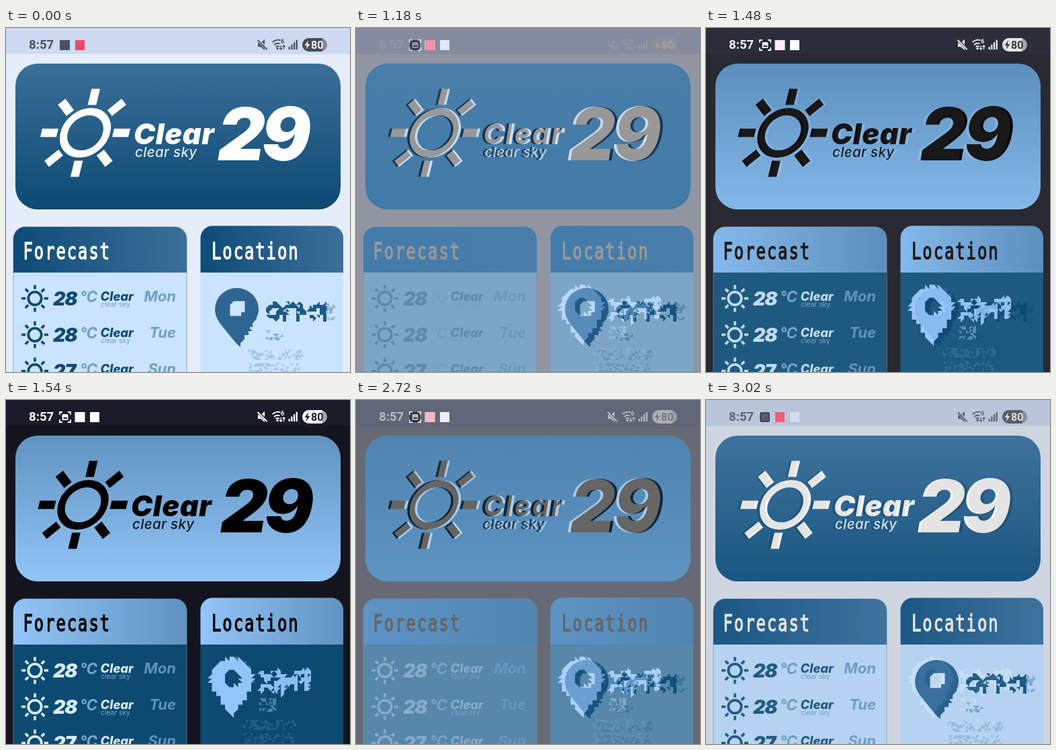
Write an HTML page that moves like this. It is 512x512 px and loops after 3.08 s.

```html
<!DOCTYPE html>
<html lang="en">
<head>
<meta charset="utf-8">
<title>Weather theme switch</title>
<style>
html, body { margin: 0; width: 100%; height: 100%; overflow: hidden; background: #14141e; }
svg { display: block; width: 100vw; height: 100vh; }
text { font-family: Inter, "Open Sans", sans-serif; white-space: pre; }
.bar { font-family: Roboto, Inter, sans-serif; font-weight: 700; }
.head { font-family: "DejaVu Sans Mono", monospace; font-size: 27px; letter-spacing: 2.3px; stroke-width: 1.1px; }
.it { font-style: italic; }
</style>
</head>
<body>
<svg id="stage" viewBox="0 0 512 512" xmlns="http://www.w3.org/2000/svg"></svg>
<script>
const LIGHT = {
  id: 'light', bg: '#e6edfa', bar: '#cddaf1', edge: '#a9bdd6',
  top: '#3b6e9a', bottom: '#0c4a73', left: '#0e4b76', right: '#3c6f9b',
  body: '#cae4ff', ink: '#ffffff', status: '#4b5161',
  pill: '#484a55', pillEnd: '#858a97', pillInk: '#f4f6fb',
  strong: '#0f4a74', soft: '#6f9fc5', day: '#6f9fc5',
  pin: '#2f6592', word: '#1f5a85', haze: '#8fb7da',
  sunX: 118, wordX: 190, tempX: 315, pinX: 343, pinY: 419,
  textBox: [382, 402, 494, 440], line2: [387, 450, 412, 465], line3: [360, 479, 443, 512],
  strokes: [
    [389, 421, 402, 410], [402, 410, 410, 419], [409, 420, 401, 432], [400, 432, 390, 427],
    [418, 411, 414, 433], [418, 414, 429, 413], [438, 408, 434, 433], [437, 419, 449, 424],
    [452, 420, 466, 413], [466, 413, 473, 433], [456, 431, 470, 428], [476, 413, 474, 433]
  ]
};
const DARK = {
  id: 'dark', bg: '#14141e', bar: '#1b1a28', edge: '#4d5866',
  top: '#6093c0', bottom: '#92c5f7', left: '#93c5f9', right: '#6093c0',
  body: '#0c4a72', ink: '#000000', status: '#ffffff',
  pill: '#f3f4f7', pillEnd: '#a6a7ac', pillInk: '#24252e',
  strong: '#d6eaff', soft: '#78a4ca', day: '#5f92bc',
  pin: '#93c5fb', word: '#8bbef2', haze: '#2e6a95',
  sunX: 114.5, wordX: 186, tempX: 319, pinX: 336, pinY: 416,
  textBox: [374, 398, 458, 440], line2: [377, 444, 401, 463], line3: [352, 476, 431, 510],
  strokes: [
    [380, 405, 397, 432], [397, 405, 380, 432], [405, 404, 403, 432],
    [413, 411, 411, 437], [413, 413, 423, 419], [423, 420, 412, 429],
    [432, 431, 430, 409], [430, 408, 450, 403], [428, 418, 442, 416], [450, 404, 447, 431]
  ]
};

let seed = 1;
const rnd = () => (seed = (seed * 48271) % 2147483647) / 2147483647;

const rect = (x, y, w, h, fill, more = '') =>
  `<rect x="${x}" y="${y}" width="${w}" height="${h}" fill="${fill}" ${more}/>`;
const text = (x, y, size, weight, fill, str, more = '') =>
  `<text x="${x}" y="${y}" font-size="${size}" font-weight="${weight}" fill="${fill}" ${more}>${str}</text>`;
const gradient = (id, a, b, dir) =>
  `<linearGradient id="${id}" x2="${dir === 'x' ? 1 : 0}" y2="${dir === 'y' ? 1 : 0}">
   <stop stop-color="${a}"/><stop offset="1" stop-color="${b}"/></linearGradient>`;

// Splits cells into triangles and keeps those whose centre passes the test.
function facets([x0, y0, x1, y1], s, fill, test) {
  let d = '';
  for (let y = y0; y < y1; y += s) {
    for (let x = x0; x < x1; x += s) {
      const c = [[x, y], [x + s, y], [x + s, y + s], [x, y + s]];
      const flip = rnd() < .5 ? 0 : 1;
      for (const start of [flip, flip + 2]) {
        const tri = [0, 1, 2].map(i => c[(start + i) % 4]);
        const mid = k => (tri[0][k] + tri[1][k] + tri[2][k]) / 3;
        if (test(mid(0), mid(1))) d += `M${tri.map(p => p.map(v => v.toFixed(1)).join(' ')).join('L')}z`;
      }
    }
  }
  return `<path d="${d}" fill="${fill}"/>`;
}

function sun(x, y, ring, ringW, from, to, rayW, color, skew = 0) {
  let rays = '';
  for (let a = 0; a < 360; a += 45) rays += `<path d="M${from} 0H${to}" transform="rotate(${a})" stroke-width="${rayW}"/>`;
  return `<g transform="translate(${x} ${y}) skewX(${skew})" fill="none" stroke="${color}">
    <circle r="${ring}" stroke-width="${ringW}"/>${rays}</g>`;
}

function statusBar(t) {
  const c = t.status;
  let s = rect(0, 0, 512, 38.5, t.bar) + text(34, 31, 18.6, 700, c, '8:57', 'class="bar"');
  if (t === LIGHT) {
    s += rect(80, 18, 15, 15, c) + rect(103, 18, 14, 15, '#ee4a6b');
  } else {
    s += `<path d="M80 22v-4h4M92 18h4v4M96 29v4h-4M84 33h-4v-4" fill="none" stroke="${c}" stroke-width="1.8"/>` +
      rect(83.5, 21, 9, 9, c, 'rx="1.5"') + `<path d="M85 28l2-3 1.5 1.7 1.3-1.4 1.8 2.7z" fill="${t.bar}"/>` +
      rect(102.5, 18, 15, 15, c) + rect(125, 18, 14, 15, c);
  }
  s += `<path d="M375 22h4l6-5v16l-6-5h-4z" fill="${c}"/>
    <path d="M374 17l15 15" stroke="${t.bar}" stroke-width="4"/>
    <path d="M374.5 18l14 14" stroke="${c}" stroke-width="1.9"/>
    <g fill="none" stroke="${c}" stroke-width="1.8">
      <path d="M396.5 21q7-5 12-2.5M399 25q4-3.5 8.5-1.5M401.5 28q2.5-2 5 0"/>
      <path d="M409 26v6m-2-2l2 2 2-2M413.5 32v-6m-2 2l2-2 2 2" stroke-width="1.3"/></g>
    <circle cx="404" cy="30.5" r="1.7" fill="${c}"/>` +
    text(409, 22.5, 9, 700, c, '6', 'class="bar"');
  for (let i = 0; i < 4; i++) s += rect(420.5 + i * 3.7, 28 - i * 3.4, 2.3, 4 + i * 3.4, c);
  return s + rect(441, 15, 37, 20, t.pillEnd, 'rx="10"') +
    `<path d="M451 15h19.5v20H451a10 10 0 0 1 0-20z" fill="${t.pill}"/>
     <path d="M450 18l-5.5 8h3.5l-1.5 6 6-8h-3.7z" fill="${t.pillInk}"/>` +
    text(454, 30.8, 16, 700, t.pillInk, '80', 'class="bar"');
}

function mainCard(t) {
  return rect(14, 53, 484, 217, `url(#${t.id}Main)`, 'rx="33"') +
    sun(t.sunX, 156, 31.6, 11, 41.5, 65.5, 12.6, t.ink, -13.5) +
    text(t.wordX, 173, 43, 900, t.ink, 'Clear', 'class="it" letter-spacing=".7"') +
    text(t.wordX + 2, 191.5, 20.4, 500, t.ink, 'clear sky', 'class="it" opacity=".87" letter-spacing=".4"') +
    text(t.tempX, 197, 109, 900, t.ink, '29', 'class="it" letter-spacing="-5.2"');
}

function panel(t, x, y, w, title, titleX, edge = 'none') {
  const r = 18;
  return rect(x, y, w, 260, t.body, `rx="${r}" stroke="${edge}" stroke-width="1.5"`) +
    `<path d="M${x} 364V${y + r}a${r} ${r} 0 0 1 ${r} ${-r}h${w - 2 * r}a${r} ${r} 0 0 1 ${r} ${r}V364z" fill="url(#${t.id}Head)"/>
     <text class="head" transform="translate(${titleX} 344) scale(.88 1.25)" fill="${t.ink}" stroke="${t.ink}">${title}</text>`;
}

function row(t, y, temp, day) {
  return sun(43, y, 9.7, 3.8, 13.8, 20, 3.6, t.strong) +
    text(70, y + 10, 28.5, 900, t.strong, temp, 'class="it" letter-spacing="-1.2"') +
    text(110, y + 5, 22.5, 700, t.soft, '°C', 'class="it" letter-spacing="-.4"') +
    text(140.5, y + 3, 18.4, 800, t.strong, 'Clear', 'class="it"') +
    text(141, y + 12.7, 10.3, 400, t.soft, 'clear sky') +
    text(253, y + 4, 22, 700, t.day, day, 'class="it" text-anchor="end"');
}

function nearStroke(list, x, y, reach) {
  return list.some(([ax, ay, bx, by]) => {
    const dx = bx - ax, dy = by - ay;
    const k = Math.max(0, Math.min(1, ((x - ax) * dx + (y - ay) * dy) / (dx * dx + dy * dy)));
    return Math.hypot(x - ax - k * dx, y - ay - k * dy) < reach;
  });
}

function place(t) {
  const cx = t.pinX, cy = t.pinY;
  const inPin = (x, y) => Math.hypot(x - cx, y - cy) < 32 ||
    (y > cy && y < cy + 55 && Math.abs(x - cx - 1) < 32 * (1 - ((y - cy) / 55) ** 1.4));
  const inHole = (x, y) => Math.hypot(x - cx - 1, y - cy + 2) < 12;
  const box = [cx - 36, cy - 34, cx + 36, cy + 57];
  let s = '';
  if (t === LIGHT) {
    s += `<path d="M${cx} 387a32 32 0 0 1 33 32q0 9-7 18L345 472Q329 453 318 439Q311 429 311 419A32 32 0 0 1 ${cx} 387z" fill="${t.pin}"/>` +
      facets(box, 6, t.pin, (x, y) => x > 346 && y > 424 && inPin(x - 1, y)) +
      facets([328, 401, 362, 435], 5.5, '#d0e6fc', inHole);
  } else {
    s += facets(box, 6.5, t.haze, (x, y) => inPin(x, y + 2) && !inPin(x + 3, y)) +
      facets(box, 6.5, t.pin, (x, y) => inPin(x, y) && !inHole(x, y));
  }
  const scatter = (b, size, fill, keep) => facets(b, size, fill, () => rnd() < keep);
  s += facets(t.textBox, 5, t.word, (x, y) => nearStroke(t.strokes, x, y, 3.5) && rnd() < .86);
  if (t === LIGHT) s += scatter([476, 410, 491, 434], 5, t.haze, .42);
  s += `<g opacity=".75">${scatter(t.line2, 5, t === LIGHT ? t.soft : '#5f94c0', .42)}</g>`;
  const [x0, y0, x1, y1] = t.line3;
  s += `<g opacity=".6">${scatter([x0, y0, x1, y0 + 14], 5, t.haze, .36)}${scatter([x0 + 2, y0 + 20, x1 - 2, y1], 5, t.haze, .36)}</g>`;
  return s;
}

function screen(t) {
  seed = 4711;
  return `<defs>${gradient(t.id + 'Main', t.top, t.bottom, 'y')}${gradient(t.id + 'Head', t.left, t.right, 'x')}</defs>
    <g id="${t.id}">${rect(0, 0, 512, 512, t.bg)}${statusBar(t)}${mainCard(t)}
    ${panel(t, 11, 296, 258, 'Forecast', 25.5, t.edge)}${panel(t, 289.5, 294.5, 212.5, 'Location', 306)}
    ${row(t, 402.5, '28', 'Mon')}${row(t, 456.5, '28', 'Tue')}${row(t, 510.5, '27', 'Sun')}
    ${place(t)}</g>`;
}

document.getElementById('stage').innerHTML = screen(LIGHT) + screen(DARK);
const dark = document.getElementById('dark');

const HALF = 1540, HOLD = 1000, STEP = 60;
function draw() {
  const now = performance.now() % (2 * HALF);
  const local = now % HALF;
  const fade = local < HOLD ? 0 : (Math.floor((local - HOLD) / STEP) + 1) / 10;
  dark.setAttribute('opacity', now < HALF ? fade : 1 - fade);
  requestAnimationFrame(draw);
}
draw();
</script>
</body>
</html>
```
